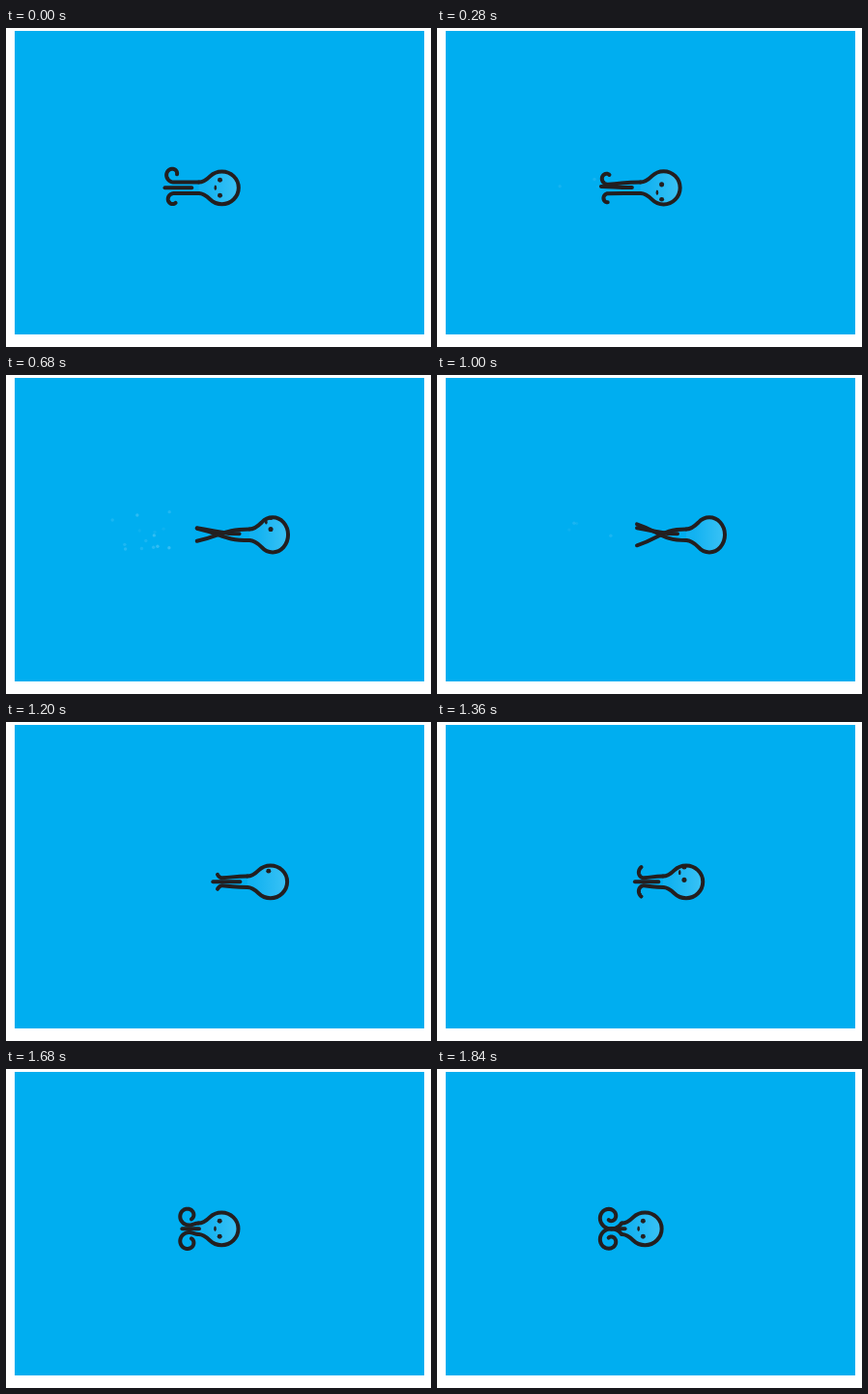
Write an HTML page with a canvas that moves like this. It is 440 px wide and 330 px high and loops after 1.88 s.

```html
<!DOCTYPE html>
<html lang="en">
<head>
<meta charset="utf-8">
<title>Swimming octopus</title>
<style>
  html, body { margin: 0; width: 100%; height: 100%; overflow: hidden; background: #fff; }
  canvas { display: block; }
</style>
</head>
<body>
<canvas id="stage" width="440" height="330"></canvas>
<script>
const ctx = document.getElementById('stage').getContext('2d');
const { sin, cos, PI } = Math;
const LOOP = 1880, HOLD = 240, STEP = 40;
const INK = '#231f20', CY = 165.3, NECK_X = 24, NECK_Y = 5.7, DEG = PI / 180;

// Smooth rise from 0 to 1 between two steps.
function ramp(step, from, to) {
  const u = Math.min(1, Math.max(0, (step - from) / (to - from)));
  return u * u * (3 - 2 * u);
}

// Straight lines through [step, value] points.
function track(step, ...points) {
  const next = points.findIndex(p => p[0] > step);
  if (next < 0) return points.at(-1)[1];
  const [[s0, v0], [s1, v1]] = points.slice(next - 1, next + 1);
  return v0 + (v1 - v0) * (step - s0) / (s1 - s0);
}

// A quick push forward, a short glide, then a slow drift back.
function headX(step) {
  const push = sin(PI / 2 * Math.min(1, (step + 1.5) / 18.5));
  const drift = (1 + cos(PI * (step - 20) / 22)) / 2;
  return 215 + 67 * (step < 20 ? push : drift);
}

// Runs from the neck to (x, y), then winds up into a spiral of the given turn.
function arm(rootX, rootY, x, y, turn, tipRadius) {
  const count = 40, delta = turn * DEG / count, radius = Math.abs(turn) / 34;
  const midX = (rootX + x) / 2, midY = (rootY + y) / 2;
  const start = Math.atan2(y - midY, x - midX);
  ctx.beginPath();
  ctx.moveTo(rootX, rootY);
  ctx.bezierCurveTo(midX, rootY, midX, midY, x, y);
  for (let i = .5; i < count; i++) {
    const length = Math.abs(delta) * (radius + (tipRadius - radius) * i / count);
    x += cos(start + delta * i) * length;
    y += sin(start + delta * i) * length;
    ctx.lineTo(x, y);
  }
  ctx.stroke();
}

function arms(step, cx, jet) {
  const curling = step > 20;
  const wind = Math.max(0, (step - 20) / 21) ** 1.35;
  const turn = curling ? 455 * wind : 285 * (1 - ramp(step, 0, 7));
  const tipRadius = curling ? 10 - 7 * wind : 3.8;
  const reach = track(step, [0, 49.5], [8, 80], [20, 75], [25, 50], [33, 37], [41, 25.6]);
  const spread = track(step, [0, 5.7], [12, 6.5], [20, 11], [25, 4]);

  // The outer arms swap sides during the push, the lower one a little later.
  const untwist = ramp(step, 20, 25);
  const upper = 1 - 2 * (ramp(step, 0, 7) - untwist);
  const lower = 1 - 2 * (ramp(step, 2, 12) - untwist);
  const x = cx - reach;
  arm(cx - NECK_X, CY - NECK_Y, x, CY - spread * upper, turn, tipRadius);
  arm(cx - NECK_X, CY + NECK_Y, x, CY + spread * lower, curling ? -turn : -turn * .8, tipRadius);

  const tipX = x - 9.5 * (1 - jet);
  arm(tipX + reach * .56, CY - jet, tipX, CY - 7 * jet, 0, 0);
}

function head(cx, rx, ry) {
  const px = rx * Math.SQRT1_2, py = ry * Math.SQRT1_2;
  const fill = ctx.createLinearGradient(cx - rx, 0, cx + rx, 0);
  fill.addColorStop(0, '#12b2f1');
  fill.addColorStop(1, '#3bc2f5');
  ctx.beginPath();
  ctx.moveTo(cx - NECK_X, CY - NECK_Y);
  ctx.bezierCurveTo(cx - 20, CY - NECK_Y, cx - px - 5, CY - py + 5, cx - px, CY - py);
  ctx.ellipse(cx, CY, rx, ry, 0, -135 * DEG, 135 * DEG);
  ctx.bezierCurveTo(cx - px - 5, CY + py - 5, cx - 20, CY + NECK_Y, cx - NECK_X, CY + NECK_Y);
  ctx.fillStyle = fill;
  ctx.fill();
  ctx.stroke();
}

// A mark on the rolling head, hidden once it has turned away.
function feature(x, angle, ry, w, h, limit) {
  const depth = cos(angle * DEG);
  if (depth <= limit) return;
  ctx.beginPath();
  ctx.ellipse(x, CY + ry * .95 * sin(angle * DEG), w, h * (.6 + depth * .4), 0, 0, 2 * PI);
  ctx.fill();
}

function face(step, cx, ry) {
  const roll = track(step, [0, 0], [7, 62], [12, 310], [20, 600], [33, 720]);
  ctx.fillStyle = INK;
  for (const side of [-30, 30]) feature(cx - 2, roll + side, ry, 2.5, 2.6, 0);
  feature(cx - 6.7, roll, ry, 1.3, 2.8, .5);
}

function bubbles(step) {
  let seed = 7;
  const random = () => (seed = seed * 16807 % 2147483647) / 2147483647;
  ctx.fillStyle = '#7dd6fa';
  for (let i = 0; i < 18; i++) {
    const delay = 14 * random() ** 1.6;
    const x = 94 + 58 * random() + 3.8 * delay, y = 136 + 47 * random();
    const age = step - 6 - delay, fade = 1 - Math.abs(age) / 6;
    if (fade <= 0) continue;
    const back = Math.max(0, -age / 6) ** 2;
    ctx.globalAlpha = fade * (.55 - delay / 50);
    ctx.beginPath();
    ctx.arc(x + 35 * back - Math.max(0, age) * .5, y + (CY - y) * back, 1.7, 0, 2 * PI);
    ctx.fill();
  }
  ctx.globalAlpha = 1;
}

function draw(step) {
  ctx.fillStyle = '#fff';
  ctx.fillRect(0, 0, 440, 330);
  ctx.fillStyle = '#00aef0';
  ctx.fillRect(9, 3, 424, 314);
  bubbles(step);

  const jet = ramp(step, 0, 7) - ramp(step, 20, 25);
  const cx = headX(step), ry = 16.9 + 1.2 * jet;
  ctx.strokeStyle = INK;
  ctx.lineWidth = 4;
  ctx.lineCap = ctx.lineJoin = 'round';
  head(cx, 17.3 - 1.3 * jet, ry);
  arms(step, cx, jet);
  face(step, cx, ry);
}

function tick() {
  const t = performance.now() % LOOP;
  draw(t < HOLD ? 0 : Math.floor((t - HOLD) / STEP) + 1);
  requestAnimationFrame(tick);
}
tick();
</script>
</body>
</html>
```
